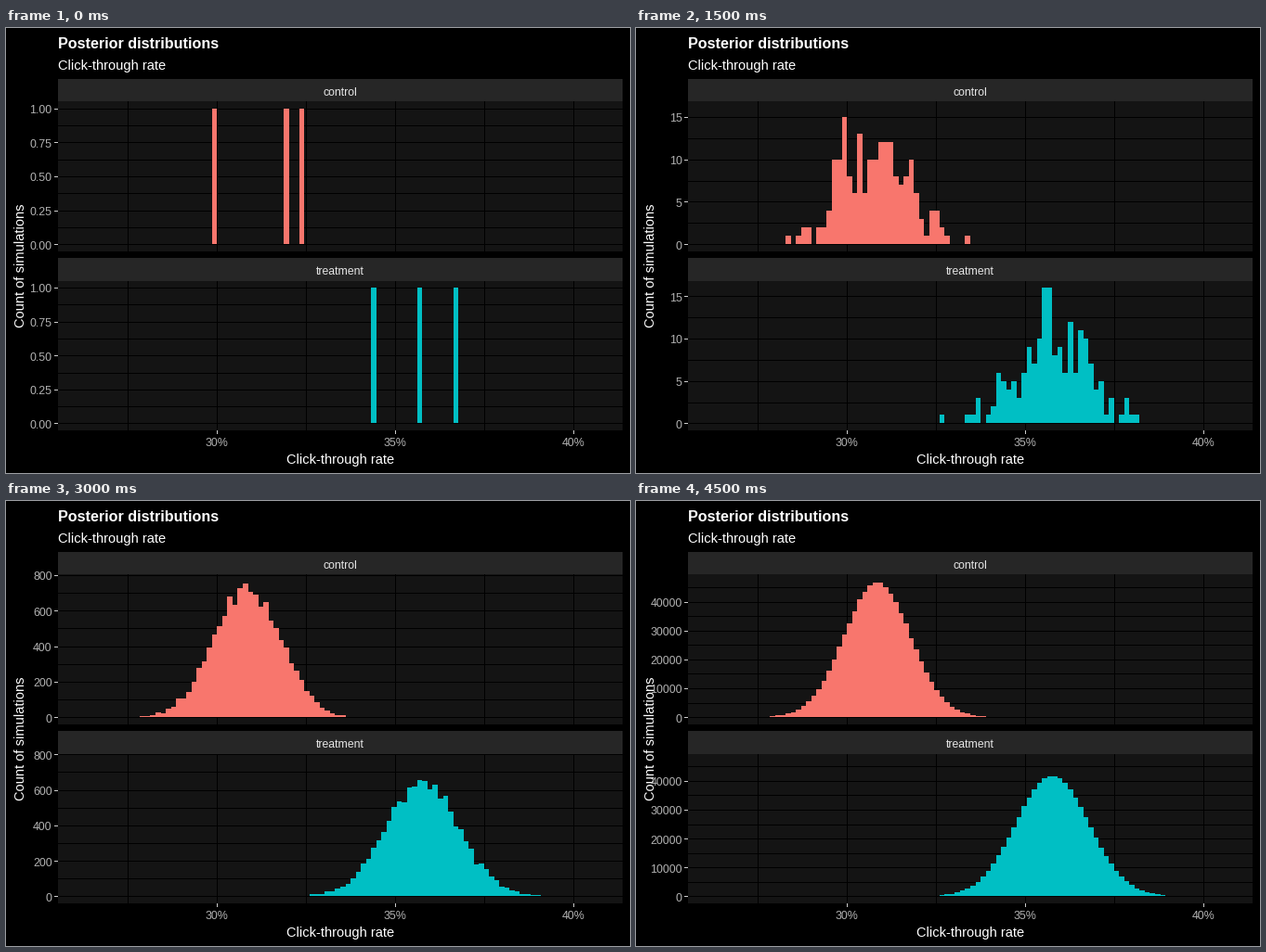
Write a matplotlib script that moves like this. It is 672 by 480 pixels and loops after 5 s.

```python
import numpy as np
import matplotlib.pyplot as plt
from matplotlib.animation import FuncAnimation
from matplotlib.patches import Rectangle

W, H, DPI = 672, 480, 96
LEFT, RIGHT = 56, 664
BINS = 100
BIN_W = (RIGHT - LEFT) / 1.1 / BINS
BIN_X = LEFT + 0.05 * BINS * BIN_W
Y_SPAN = 146.4

plt.rcParams["font.family"] = "Liberation Sans"
fig = plt.figure(figsize=(W / DPI, H / DPI), dpi=DPI, facecolor="black")
ax = fig.add_axes([0, 0, 1, 1])
ax.set_xlim(0, W)
ax.set_ylim(H, 0)
ax.axis("off")

PANELS = [
    dict(name="control", strip=55, top=79, bottom=241, zero=233.15,
         color="#F8766D", mean=31.9, sd=6.45, height=1.0, first=[25, 39, 42]),
    dict(name="treatment", strip=248, top=273, bottom=434, zero=426.45,
         color="#00BFC4", mean=66.0, sd=7.1, height=0.895, first=[56, 65, 72]),
]

# largest count, tick step, decimals
STAGES = [
    (1, 0.25, 2), (2, 0.5, 1), (7, 2, 0), (16, 5, 0), (51, 10, 0),
    (193, 50, 0), (765, 200, 0), (3010, 1000, 0), (11500, 3000, 0),
    (47000, 10000, 0),
]


def simulate(panel, seed):
    """Histogram of each stage; every stage adds draws to the one before."""
    rng = np.random.default_rng(seed)
    z = (np.arange(BINS) + 0.5 - panel["mean"]) / panel["sd"]
    bell = panel["height"] * np.exp(-z * z / 2)
    total = np.bincount(panel["first"], minlength=BINS)
    history, peak = [total], 0
    for top, _, _ in STAGES[1:]:
        # the tallest bin stands a little above the smooth curve
        new_peak = top - 1.1 * np.sqrt(top)
        total = np.minimum(total + rng.poisson(bell * (new_peak - peak)), top)
        history.append(total)
        peak = new_peak
    return history


def px(v):
    return int(np.floor(v + 0.5))


def box(x0, y0, x1, y1, color, z=1):
    return ax.add_patch(Rectangle((x0, y0), x1 - x0, y1 - y0, facecolor=color,
                                  linewidth=0, antialiased=False, zorder=z))


def text(x, y, s, size, color="white", ha="left", **kw):
    return ax.text(x, y, s, fontsize=size * 72 / DPI, color=color, ha=ha,
                   va="baseline", zorder=5, **kw)


def draw_static():
    text(56, 21.5, "Posterior distributions", 16.1, weight="bold")
    text(56, 45, "Click-through rate", 14.6)
    for p in PANELS:
        box(LEFT, p["strip"], RIGHT, p["top"], "#262626")
        box(LEFT, p["top"], RIGHT, p["bottom"], "#141414")
        text(360, p["strip"] + 18.4, p["name"], 12.3, "#E5E5E5", "center")
        for x in range(131, 612, 96):
            box(x, p["top"], x + 1, p["bottom"], "black", 2)
    for i, x in enumerate((227, 419, 611)):
        box(x, 434, x + 1, 438, "#CCCCCC")
        text(x, 451.3, f"{30 + 5 * i}%", 12.4, "#B2B2B2", "center")
    text(360, 470, "Click-through rate", 14.6, ha="center")
    text(20, 256.5, "Count of simulations", 14.6, ha="center",
         rotation=90, rotation_mode="anchor")


def draw_scale(panel, stage):
    top, step, digits = STAGES[stage]
    half = 0
    while (y := panel["zero"] - half * step / 2 * Y_SPAN / top) >= panel["top"]:
        row = px(y)
        yield box(LEFT, row, RIGHT, row + 1, "black", 2)
        if half % 2 == 0:
            yield box(52, row, LEFT, row + 1, "#CCCCCC")
            yield text(49.5, y + 5.4, f"{half * step / 2:.{digits}f}", 12.4,
                       "#B2B2B2", "right")
        half += 1


def draw_bars(panel, counts, top):
    base = px(panel["zero"])
    for b in np.flatnonzero(counts):
        y = px(panel["zero"] - counts[b] * Y_SPAN / top)
        if y < base:
            x0, x1 = px(BIN_X + b * BIN_W), px(BIN_X + (b + 1) * BIN_W)
            yield box(x0, y, x1, base, panel["color"], 3)


live = []
histories = [simulate(p, seed) for seed, p in enumerate(PANELS, start=7)]


def draw(stage):
    while live:
        live.pop().remove()
    for panel, history in zip(PANELS, histories):
        live.extend(draw_scale(panel, stage))
        live.extend(draw_bars(panel, history[stage], STAGES[stage][0]))
    return live


draw_static()
anim = FuncAnimation(fig, draw, frames=len(STAGES), init_func=lambda: draw(0),
                     interval=500, repeat=True, repeat_delay=0, blit=False)
plt.show()
```
